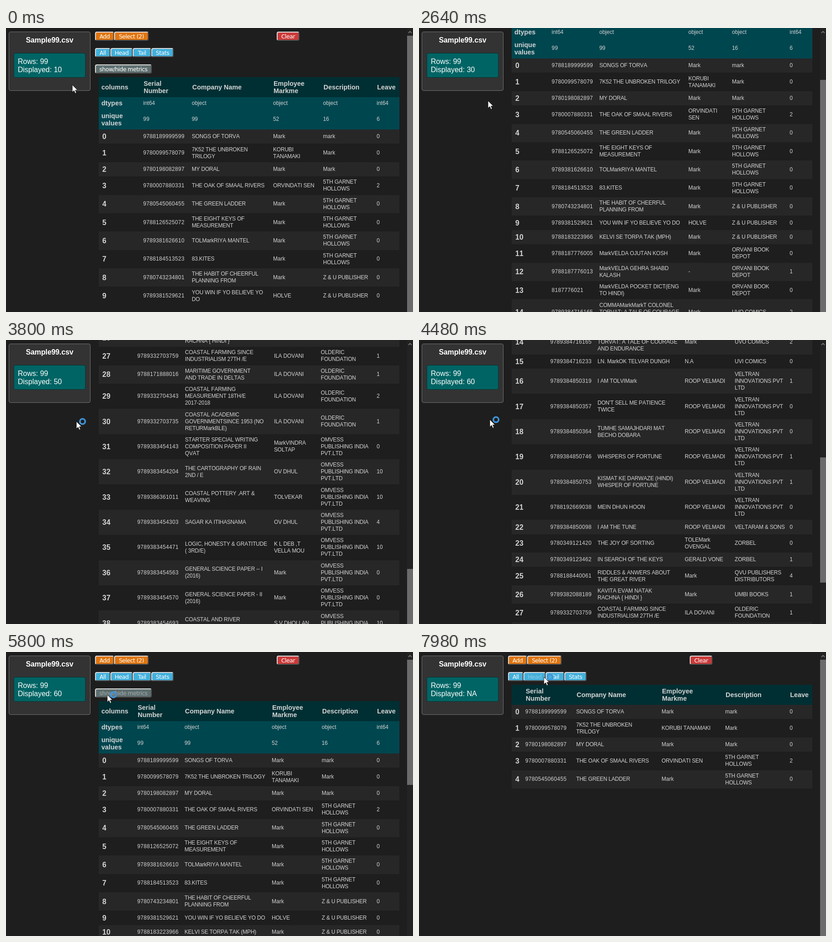
Animation, 896 px wide and 624 px high, one loop 8 s. Source, as an HTML page:

```html
<!DOCTYPE html>
<html lang="en">
<head>
<meta charset="utf-8">
<title>CSV viewer</title>
<style>
html, body { margin: 0; width: 100%; height: 100%; overflow: hidden; background: #1e1e1e; }
#stage { position: relative; width: 896px; height: 624px; overflow: hidden; background: #1e1e1e;
  color: #d4d4d4; font: 12px/15px "Liberation Sans", Arial, sans-serif; font-kerning: none; }
#side { position: absolute; left: 6px; top: 8px; width: 178px; height: 128px; background: #333;
  border: 1px solid #747474; border-radius: 4px; color: #fff; font-size: 16px; line-height: 18px; }
#side h1 { margin: 9px 0 0; font-size: 16px; line-height: 18px; text-align: center; letter-spacing: -.1px; }
#info { position: absolute; left: 10px; top: 46px; width: 148px; height: 43px; padding: 9px 0 0 8px;
  background: #006464; border: 1px solid #00383a; border-radius: 4px; white-space: nowrap; }
#count.sel { background: #fff; color: #00686a; }
#page { position: absolute; left: 0; top: 0; width: 882px; }
button { position: absolute; height: 20px; box-sizing: border-box; padding: 0; border: 2px outset #ddd;
  border-color: #dcdcdc #a4a4a4 #a4a4a4 #dcdcdc; border-radius: 4px; color: #fff;
  font: 12.5px/15px "DejaVu Sans", Verdana, sans-serif; letter-spacing: -.5px; white-space: nowrap; }
button.busy { color: rgba(225, 225, 225, .5); }
.orange { background: #e0750f; }
.red { background: #cb3a3a; }
.blue { background: #42b0db; }
.gray { background: #5f6f70; }
#table { position: absolute; left: 204px; top: 108px; width: 662px; }
.row { display: grid; grid-template-columns: var(--cols); align-items: center; box-sizing: border-box;
  min-height: 31.4px; padding: 5.2px 0; }
.row.even { background: #272727; }
.row b { font-size: 16px; padding-left: 8px; }
.title, .author, .pub { letter-spacing: -.2px; }
.serial { letter-spacing: .33px; }
.title { max-width: var(--title); }
.author { max-width: var(--author); }
.mixed { letter-spacing: 0; }
.head { height: 44px; background: #002f33; font-weight: bold; }
.head, .meta b { font-size: 14.4px; line-height: 16px; }
.head span { padding-left: 1px; }
.head span:first-child, .meta b { padding-left: 6px; }
.meta { background: #00464f; min-height: 0; }
.dtypes { height: 26px; }
.unique { height: 45px; }
#bar { position: absolute; left: 883px; top: 0; width: 13px; height: 624px; background: #232323; }
#thumb { position: absolute; left: 0; top: 17px; width: 13px; background: #6b6b6b; }
#bar svg { position: absolute; left: 2px; top: 6px; }
#halo { position: absolute; left: -11px; top: -11px; width: 22px; height: 22px; border-radius: 50%;
  background: rgba(214, 208, 20, .68); }
#mouse { position: absolute; left: 0; top: 0; }
#mouse svg { position: absolute; left: 0; top: 0; overflow: visible; }
[hidden] { display: none !important; }
</style>
</head>
<body>
<div id="stage">
  <div id="page">
    <div id="buttons"></div>
    <div id="table"></div>
  </div>
  <div id="bar">
    <div id="thumb"></div>
    <svg width="9" height="6"><path d="M1 5 4.500 1.500 8 5" fill="none" stroke="#8a8a8a" stroke-width="1.500"/></svg>
  </div>
  <div id="side">
    <h1>Sample99.csv</h1>
    <div id="info">Rows: 99<br>Displayed: <span id="count">10</span></div>
  </div>
  <div id="mouse">
    <div id="halo"></div>
    <svg id="beam" width="1" height="1"><path d="M-3-8Q0-8 0-6V6Q0 8-3 8M3-8Q0-8 0-6M0 6Q0 8 3 8" fill="none" stroke="#333"/></svg>
    <svg id="arrow" width="1" height="1"><path d="M0 0V16L3.800 12.500 6.500 18.500 9 17.400 6.400 11.600H11.500Z" fill="#fff" stroke="#111" stroke-width=".8"/></svg>
    <svg id="ring" width="1" height="1"><circle cx="13.500" r="5.800" fill="none" stroke="#3f94dc" stroke-width="3.600"/></svg>
  </div>
</div>
<script>
const $ = id => document.getElementById(id);
const LOOP = 8000;

// serial; title; author; publisher; leave ("|" breaks a line)
const five = "5TH GARNET|HOLLOWS", zu = "Z & U PUBLISHER", depot = "ORVANI BOOK|DEPOT",
  vel = "VELTRAN|INNOVATIONS PVT|LTD", old = "OLDERIC|FOUNDATION", omv = "OMVESS|PUBLISHING INDIA|PVT.LTD";
const rows = `9788189999599;SONGS OF TORVA;Mark;mark;0
9780099578079;7K52 THE UNBROKEN TRILOGY;KORUBI TANAMAKI;Mark;0
9780198082897;MY DORAL;Mark;Mark;0
9780007880331;THE OAK OF SMAAL RIVERS;ORVINDATI SEN;${five};2
9780545060455;THE GREEN LADDER;Mark;${five};0
9788126525072;THE EIGHT KEYS OF|MEASUREMENT;Mark;${five};0
9789381626610;TOLMarkRIYA MANTEL;Mark;${five};0
9788184513523;83.KITES;Mark;${five};0
9780743234801;THE HABIT OF CHEERFUL|PLANNING FROM;Mark;${zu};0
9789381529621;YOU WIN IF YO BELIEVE YO DO;HOLVE;${zu};0
9788183223966;KELVI SE TORPA TAK (MPH);Mark;${zu};0
9788187776005;MarkVELDA OJUTAN KOSH;Mark;${depot};0
9788187776013;MarkVELDA GEHRA SHABD|KALASH;-;${depot};1
8187776021;MarkVELDA POCKET DICT(ENG|TO HINDI);Mark;${depot};0
9789384716165;COMMAMarkMarkT COLONEL|TORVAT: A TALE OF COURAGE|AND ENDURANCE;Mark;UVO COMICS;2
9789384716233;LN. MarkOK TELVAR DUNGH;N.A;UVI COMICS;0
9789384850319;I AM TOLVIMark;ROOP VELMADI;${vel};1
9789384850357;DON'T SELL ME PATIENCE|TWICE;ROOP VELMADI;${vel};0
9789384850364;TUMHE SAMAJHDARI MAT|BECHO DOBARA;ROOP VELMADI;${vel};0
9789384850746;WHISPERS OF FORTUNE;ROOP VELMADI;${vel};1
9789384850753;KISMAT KE DARWAZE (HINDI)|WHISPER OF FORTUNE;ROOP VELMADI;${vel};1
9788192669038;MEIN DHUN HOON;ROOP VELMADI;${vel};0
9789384850098;I AM THE TUNE;ROOP VELMADI;VELTARAM & SONS;0
9780349121420;THE JOY OF SORTING;TOLEMark|OVENGAL;ZORBEL;0
9780349123462;IN SEARCH OF THE KEYS;GERALD VONE;ZORBEL;1
9788188440061;RIDDLES & ANWERS ABOUT|THE GREAT RIVER;Mark;QVU PUBLISHERS|DISTRIBUTORS;4
9789382088189;KAVITA EVAM NATAK|RACHNA { HINDI };Mark;UMBI BOOKS;1
9789332703759;COASTAL FARMING SINCE|INDUSTRIALISM 27TH /E;ILA DOVANI;${old};1
9788171888016;MARITIME GOVERNMENT|AND TRADE IN DELTAS;ILA DOVANI;${old};1
9789332704343;COASTAL FARMING|MEASUREMENT 18TH/E|2017-2018;ILA DOVANI;${old};2
9789332703735;COASTAL ACADEMIC|GOVERNMENTSINCE 1953 (NO|RETURMarkBLE);ILA DOVANI;${old};1
9789383454143;STARTER SPECIAL WRITING|COMPOSITION PAPER II|QVAT;MarkVINDRA|SOLTAP;${omv};0
9789383454204;THE CARTOGRAPHY OF RAIN|2ND / E;OV DHUL;${omv};10
9789386361011;COASTAL POTTERY ,ART &|WEAVING;TOLVEKAR;${omv};10
9789383454303;SAGAR KA ITIHASNAMA;OV DHUL;${omv};4
9789383454471;LOGIC, HONESTY & GRATITUDE|( 3RD/E);K L DEB ,T|VELLA MOU;${omv};10
9789383454563;GENERAL SCIENCE PAPER -- I|(2016);Mark;${omv};0
9789383454570;GENERAL SCIENCE PAPER - II|(2016);Mark;${omv};0
9789383454693;COASTAL AND RIVER|GEOLOGY;S V DHOLLAN;${omv};10`.split("\n").map(r => r.split(";"));
while (rows.length < 60) {
  const i = rows.length, base = rows[31 + i % 8];
  rows.push([+base[0] + i * 17, ...base.slice(1)]);
}

// column starts, then wrap widths of title and author
const layouts = {
  ten: [302, 409, 588, 698, 816, 167, 100],
  thirty: [292, 397, 593, 689, 816, 190, 80],
  fifty: [289, 394, 590, 693, 816, 190, 97],
  sixty: [289, 393, 585, 695, 816, 190, 100],
  head: [234, 346, 534, 674, 816, 170, 132]
};

// time, rows, layout, label, scrollbar ratio
const views = [
  [0, 10, "ten", "10", 1],
  [1900, 20, "thirty", "20", .82],
  [2540, 30, "thirty", "30", .62],
  [3000, 40, "fifty", "40", .43],
  [3400, 50, "fifty", "50", .363],
  [4000, 60, "sixty", "60", .31],
  [7540, 5, "head", "NA", 1]
];
const scrolls = [[0, 0], [2000, 0], [2400, 156], [2660, 156], [3000, 480], [3330, 1150], [3400, 1180],
  [3780, 1340], [3830, 1340], [4000, 1600], [4160, 1750], [4200, 1750], [4460, 776], [4500, 776],
  [4920, 200], [5020, 200], [5220, 0]];
const moves = [[0, 146, 125], [90, 146, 125], [360, 140, 97], [530, 140, 97], [880, 109, 91], [1360, 109, 91],
  [1440, 106, 91], [1600, 106, 91], [2000, 152, 160], [3000, 152, 160], [3330, 155, 179], [4160, 155, 179],
  [4460, 156, 175], [4920, 156, 175], [5020, 158, 175], [5750, 223, 94], [6750, 223, 94], [7470, 275, 55]];
const waits = [[3380, 5000], [5760, 5960], [6660, 6860], [7480, LOOP]];

const lines = s => String(s).includes("|")
  ? s.replace(/ /g, "\u00a0").replace(/&/g, "&amp;").replace(/\|/g, "<br>")
  : String(s).replace(/&/g, "&amp;");

function addRow(kind, first, cells) {
  const names = ["serial", "title", "author", "pub", "leave"];
  const el = document.createElement("div");
  el.className = "row " + kind;
  const tag = kind === "head" ? "span" : "b";
  el.innerHTML = `<${tag}>${first}</${tag}>` + cells.map((c, i) => {
    const mixed = kind === "head" || /^(mark|object|int64)$/i.test(c);
    return `<span class="${names[i]}${mixed ? " mixed" : ""}">${lines(c)}</span>`;
  }).join("");
  $("table").append(el);
  return el;
}

function addButton(text, color, x, y, w) {
  const el = document.createElement("button");
  el.textContent = text;
  el.className = color;
  el.style.cssText = `left:${x}px;top:${y}px;width:${w}px`;
  $("buttons").append(el);
  return el;
}

addButton("Add", "orange", 196, 8, 42);
addButton("Select (2)", "orange", 238, 8, 76);
addButton("Clear", "red", 596, 8, 50);
addButton("All", "blue", 196, 44, 34);
const headButton = addButton("Head", "blue", 230, 44, 49);
addButton("Tail", "blue", 279, 44, 41);
addButton("Stats", "blue", 320, 44, 49);
const metricsButton = addButton("show/hide metrics", "gray", 196, 80, 125);

const header = addRow("head", "columns", ["Serial|Number", "Company Name", "Employee|Markme", "Description", "Leave"]);
const metrics = [
  addRow("meta dtypes", "dtypes", ["int64", "object", "object", "object", "int64"]),
  addRow("meta unique", "unique<br>values", ["99", "99", "52", "16", "6"])
];
const body = rows.map((r, i) => addRow(i % 2 ? "odd" : "even", i, r));

let shown;
function show(view) {
  if (view === shown) return;
  shown = view;
  const [, n, name, label] = view, l = layouts[name], isHead = name === "head";
  const starts = [204, ...l.slice(0, 5)];
  const cols = starts.slice(1).map((x, i) => x - starts[i] + "px").join(" ") + " 1fr";
  const style = $("table").style;
  style.setProperty("--cols", cols);
  style.setProperty("--title", l[5] + "px");
  style.setProperty("--author", l[6] + "px");
  style.top = (isHead ? 72 : 108) + "px";
  header.firstChild.textContent = isHead ? "" : "columns";
  metricsButton.hidden = isHead;
  body.forEach((el, i) => el.hidden = i >= n);
  $("count").textContent = label;
}

// position between two keys
function tween(keys, t, smooth) {
  const i = keys.findIndex(k => k[0] > t);
  if (i < 0) return keys[keys.length - 1].slice(1);
  const a = keys[i - 1], b = keys[i];
  let p = (t - a[0]) / (b[0] - a[0]);
  if (smooth) p = p * p * (3 - 2 * p);
  return a.slice(1).map((v, j) => v + (b[j + 1] - v) * p);
}

const within = (t, a, b) => t >= a && t < b;

function draw(t) {
  const view = views.filter(v => v[0] <= t).pop();
  show(view);
  const noMetrics = view[2] === "head" || within(t, 5920, 6700);
  metrics.forEach(el => el.hidden = noMetrics);
  metricsButton.classList.toggle("busy", within(t, 5770, 5960) || within(t, 6660, 6800));
  headButton.classList.toggle("busy", t >= 7480);
  $("count").className = within(t, 1360, 1900) ? "sel" : "";

  const y = Math.round(tween(scrolls, t)[0]), ratio = view[4];
  $("page").style.transform = `translateY(${-y}px)`;
  $("thumb").style.top = 17 + y * ratio + "px";
  $("thumb").style.height = 887 * ratio + "px";

  const [mx, my] = tween(moves, t, true);
  const beam = within(t, 840, 1640);
  $("mouse").style.transform = `translate(${Math.round(mx)}px,${Math.round(my)}px)`;
  $("beam").style.display = beam ? "" : "none";
  $("arrow").style.display = beam ? "none" : "";
  $("halo").hidden = !within(t, 860, 1600);
  $("ring").style.display = waits.some(w => within(t, w[0], w[1])) ? "" : "none";
}

const start = performance.now();
function tick() {
  draw((performance.now() - start) % LOOP);
  requestAnimationFrame(tick);
}
tick();
</script>
</body>
</html>
```
